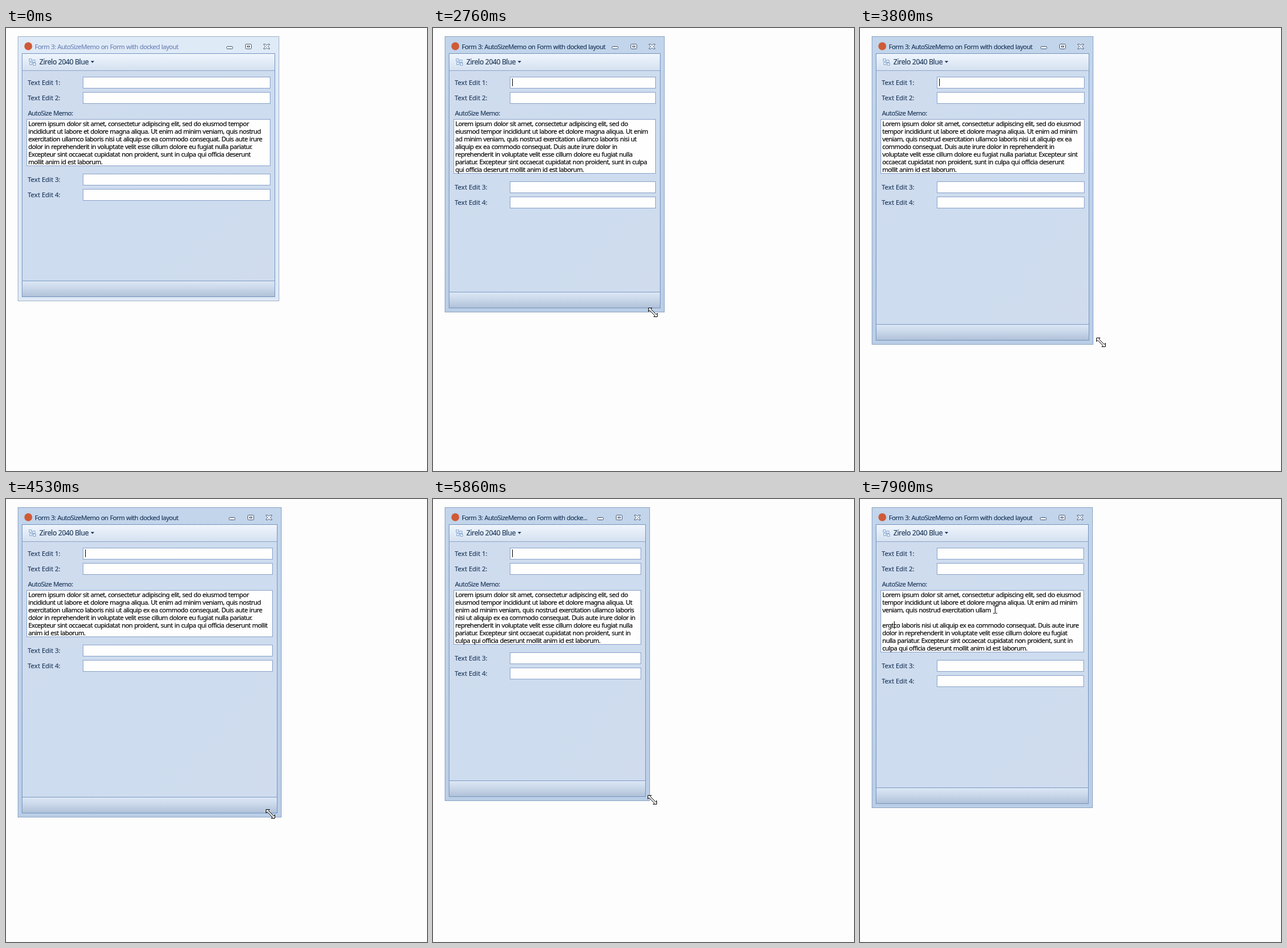
An HTML page for the animation above (8000 ms loop, 718 by 754 pixels).

```html
<!DOCTYPE html>
<html lang="en">
<head>
<meta charset="utf-8">
<title>Auto-sizing memo</title>
<style>
  html, body { margin: 0; width: 100%; height: 100%; overflow: hidden; background: #fdfdfd; }
  svg { display: block; width: 718px; height: 754px; }
  text {
    font: 11px "Noto Sans", "Open Sans", sans-serif; white-space: pre;
    color: #1e395b; fill: currentColor; stroke: currentColor; stroke-width: .15px;
  }
  .tight { letter-spacing: -.54px; word-spacing: .5px; }
  .memo { color: #000; }
  .theme { font-size: 12px; letter-spacing: -.42px; }
  .edit { fill: #fefefe; stroke: #8ba3c9; }
  .crisp { shape-rendering: crispEdges; }
</style>
</head>
<body>
<svg id="stage" viewBox="0 0 718 754">
  <defs>
    <linearGradient id="bar" x2="0" y2="1">
      <stop stop-color="#eff5fc"/><stop offset="1" stop-color="#d5e1f1"/>
    </linearGradient>
    <linearGradient id="status" x2="0" y2="1">
      <stop stop-color="#dce7f5"/><stop offset=".45" stop-color="#cad8ea"/><stop offset="1" stop-color="#b0c1d8"/>
    </linearGradient>
    <linearGradient id="body" x2="1" y2="1">
      <stop stop-color="#d0dcee"/><stop offset=".55" stop-color="#cddcef"/><stop offset="1" stop-color="#d0dcee"/>
    </linearGradient>
    <linearGradient id="active" x2="0" y2="1">
      <stop stop-color="#c2d5eb"/><stop offset="1" stop-color="#bacee6"/>
    </linearGradient>
  </defs>
</svg>
<script>
const LOOP = 8000;
const svg = document.getElementById("stage");

function set(node, attrs) {
  for (const key in attrs) node.setAttribute(key, attrs[key]);
}
function el(tag, attrs = {}, parent = svg) {
  const node = document.createElementNS("http://www.w3.org/2000/svg", tag);
  set(node, attrs);
  return parent.appendChild(node);
}
function label(x, y, str, cls = "") {
  const node = el("text", { x, y, class: cls });
  node.textContent = str;
  return node;
}
const rect = (attrs) => el("rect", { class: "crisp", ...attrs });
const show = (node, on) => set(node, { visibility: on ? "visible" : "hidden" });

// Advance widths of the form's UI face, used for wrapping and ellipsis
const WIDE = { 2: "il", 3: " ,.f", 4: "rt:", 5: "csxkzyL", 7: "UD", 8: "w", 9: "mM" };
const ADVANCE = {};
for (const w in WIDE) for (const c of WIDE[w]) ADVANCE[c] = +w;
const width = (str) => [...str].reduce((sum, c) => sum + (ADVANCE[c] || 6), 0);

function wrap(str, max) {
  const lines = [];
  for (const para of str.split("\n")) {
    let line = "";
    for (const word of para.split(" ")) {
      const longer = line ? line + " " + word : word;
      if (line && width(longer) > max) {
        lines.push(line);
        line = word;
      } else line = longer;
    }
    lines.push(line);
  }
  return lines;
}
function clip(str, max) {
  if (width(str) <= max) return str;
  while (width(str + "...") > max) str = str.slice(0, -1);
  return str.trimEnd() + "...";
}

const TITLE = "Form 3: AutoSizeMemo on Form with docked layout";
const HEAD = "Lorem ipsum dolor sit amet, consectetur adipiscing elit, sed do eiusmod tempor " +
  "incididunt ut labore et dolore magna aliqua. Ut enim ad minim veniam, quis nostrud exercitation ullam";
const TAIL = "co laboris nisi ut aliquip ex ea commodo consequat. Duis aute irure dolor in " +
  "reprehenderit in voluptate velit esse cillum dolore eu fugiat nulla pariatur. Excepteur sint " +
  "occaecat cupidatat non proident, sunt in culpa qui officia deserunt mollit anim id est laborum.";
const TYPED = "\n\nergt";

// Pointer motion: each axis is a chain of eased moves
const easeIn = (k) => k ** 1.75;
const easeOut = (k) => 1 - (1 - k) ** 1.5;
const easeBoth = (k) => (1 - Math.cos(Math.PI * k)) / 2;

function chain(value) {
  const moves = [];
  const at = (t) => Math.round(moves.reduce((v, m) => {
    const k = Math.min(Math.max((t - m.from) / (m.until - m.from), 0), 1);
    return v + (m.to - v) * m.ease(k);
  }, value));
  at.move = (from, until, to, ease = easeBoth) => {
    moves.push({ from, until, to, ease });
    return at;
  };
  return at;
}

const pointerX = chain(617)
  .move(400, 750, 345).move(750, 1100, 462)
  .move(2400, 3160, 274)
  .move(3260, 3800, 411, easeIn).move(3800, 4030, 442, easeOut)
  .move(4060, 4260, 466)
  .move(4500, 5200, 243, easeOut)
  .move(5400, 6015, 393, easeOut)
  .move(6160, 6460, 238, easeOut).move(6600, 6930, 230);

const pointerY = chain(642)
  .move(400, 1100, 457).move(1300, 1400, 465).move(1700, 1830, 461)
  .move(2400, 3160, 510)
  .move(3260, 3760, 535, easeOut)
  .move(4060, 4260, 538)
  .move(4500, 4990, 521, easeOut).move(5040, 5200, 497)
  .move(5400, 6015, 522, easeIn)
  .move(6160, 6460, 161, easeOut).move(6600, 6930, 188);

// Window chrome
const frame = rect({ x: 20.5, y: 14.5 });
const inner = rect({ x: 27.5, y: 43.5, fill: "url(#body)", stroke: "#7896c0" });
const bar = rect({ x: 28, y: 44, height: 28, fill: "url(#bar)" });
const barLine = rect({ x: 28, y: 72, height: 1, fill: "#8fa6c7" });
const status = rect({ x: 28, height: 26, fill: "url(#status)" });
const statusLine = rect({ x: 28, height: 1, fill: "#7f9bc4" });
el("circle", { cx: 38, cy: 31, r: 6.7, fill: "#cf5a36" });
const title = label(49, 36, TITLE, "tight");

const buttons = el("g", { fill: "#fafcff", stroke: "#465672" });
el("rect", { x: -89.5, y: 31.5, width: 10, height: 4, rx: 1 }, buttons);
el("rect", { x: -57.5, y: 27.5, width: 10, height: 8, rx: 1 }, buttons);
el("rect", { x: -54.5, y: 30.5, width: 4, height: 2 }, buttons);
el("path", { d: "M-26.5 27.5h3l2 2 2-2h3v1l-3 3 3 3v1h-3l-2-2-2 2h-3v-1l3-3-3-3z" }, buttons);

// Toolbar
el("path", {
  class: "crisp", fill: "#e8f1fb", stroke: "#8aa9d0",
  d: "M39.5 52.5h4v4h-4zM45.5 54.5h4v4h-4zM40.5 58.5h4v4h-4zM46.5 59.5h4v4h-4z"
});
label(57, 62, "Zirelo 2040 Blue", "theme");
el("path", { d: "M144.5 56h6l-3 3.4z", fill: "#1e395b" });

// Fields
const edits = [1, 2, 3, 4].map((n) => ({
  box: rect({ x: 131.5, height: 19, class: "crisp edit" }),
  name: label(37, 0, `Text Edit ${n}:`)
}));
label(37.5, 149, "AutoSize Memo:", "tight");
const LINE = 13;
const memo = rect({ x: 35.5, y: 155.5, class: "crisp edit" });
const rows = Array.from({ length: 14 }, (_, i) => label(38, 167 + i * LINE, "", "tight memo"));
const caret = rect({ width: 1, height: LINE, fill: "#000" });

// Pointers
const outline = { fill: "#fff", stroke: "#000" };
const cursors = {
  arrow: el("path", { ...outline, d: "M.5 .5v16l3.7-3.5 2.6 5.8 2.4-1-2.5-5.8h5z" }),
  resize: el("path", { ...outline, d: "M-7.5-7.5h6l-2 2 9 9 2-2v6h-6l2-2-9-9-2 2z" }),
  beam: el("path", {
    fill: "none", stroke: "#000", class: "crisp",
    d: "M-3-6.5h3M1-6.5h3M.5-6v12M-3 6.5h3M1 6.5h3"
  })
};

function cursorAt(t, y) {
  if (t < 400) return "";
  if (t < 1100 || (t >= 1700 && t < 1830)) return "arrow";
  if (t < 6190) return "resize";
  return y < 248 ? "beam" : "arrow";
}

function placeEdit(edit, y, right) {
  set(edit.box, { y: y + .5, width: right - 132 });
  set(edit.name, { y: y + 14 });
}

function drawForm(t) {
  // The window trails the pointer slightly while being dragged
  const held = Math.min(Math.max(t - 40, 2360), 6150);
  const right = pointerX(held) + 4, bottom = pointerY(held) + 4;
  const active = t >= 2160, span = right - 36;

  set(frame, {
    width: right - 21, height: bottom - 15,
    fill: active ? "url(#active)" : "#dfeaf7", stroke: active ? "#8ea5c4" : "#a3b3c9"
  });
  set(inner, { width: right - 35, height: bottom - 51 });
  for (const node of [bar, barLine, status, statusLine]) set(node, { width: span });
  set(status, { y: bottom - 34 });
  set(statusLine, { y: bottom - 35 });
  set(buttons, { transform: `translate(${right})` });
  title.textContent = clip(TITLE, right - 148);
  title.style.color = active ? "" : "#6f86b8";

  const typed = t < 7630 ? "" : TYPED.slice(0, 1 + Math.floor((t - 7630) / 54));
  const lines = wrap(HEAD + typed + TAIL, right - 57);
  rows.forEach((row, i) => { row.textContent = lines[i] || ""; });
  const end = 157 + lines.length * LINE;
  set(memo, { width: right - 51, height: end - 156 });
  [83, 109, end + 13, end + 39].forEach((y, i) => placeEdit(edits[i], y, right - 15));

  if (t < 6930) {
    set(caret, { x: 135, y: 86 });
  } else {
    const before = wrap(HEAD + typed, right - 57);
    const last = before.length - 1;
    set(caret, { x: 38 + width(before[last]), y: 156 + last * LINE });
  }
  show(caret, active && !(t >= 7460 && t < 7630));
}

function draw(t) {
  drawForm(t);
  const x = pointerX(t), y = pointerY(t);
  const kind = cursorAt(t, y);
  for (const name in cursors) {
    show(cursors[name], name === kind);
    set(cursors[name], { transform: `translate(${x} ${y})` });
  }
}

const start = performance.now();
function tick() {
  draw((performance.now() - start) % LOOP);
  requestAnimationFrame(tick);
}
tick();
</script>
</body>
</html>
```
